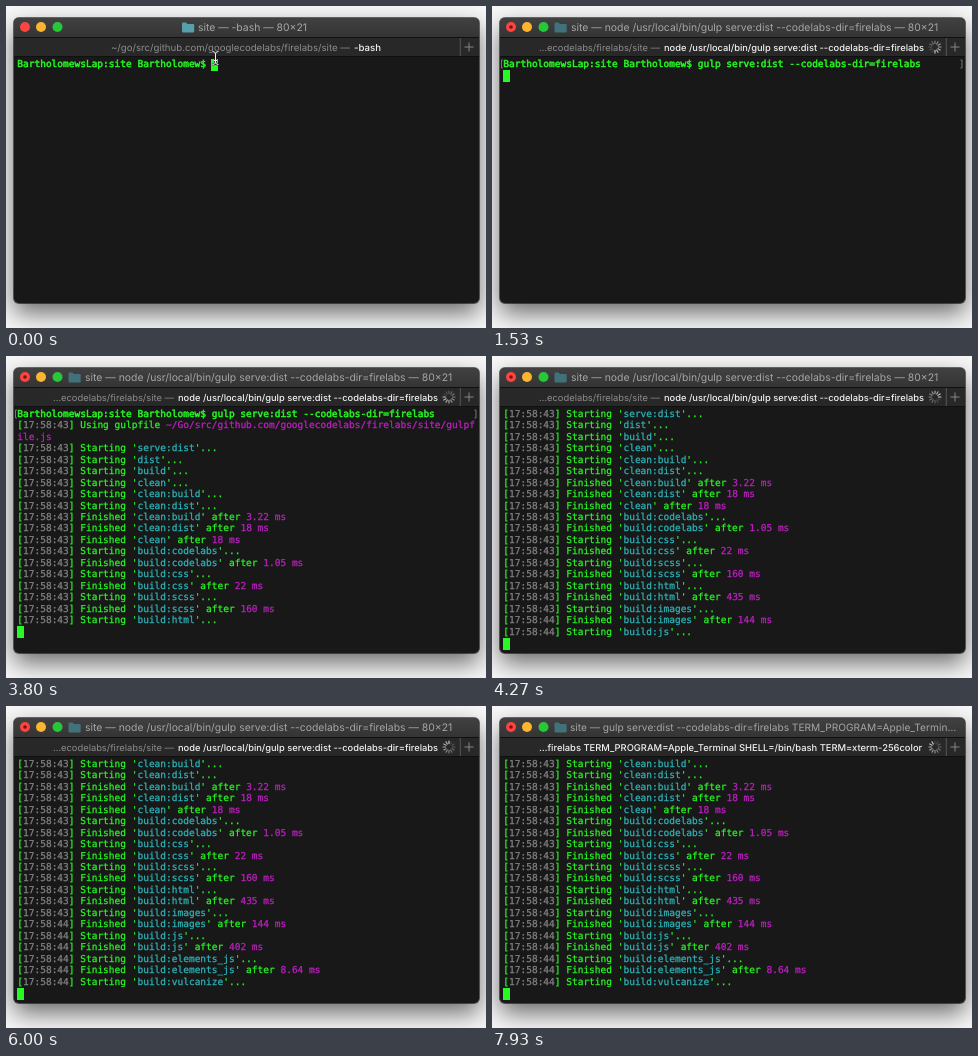
An HTML page that plays this animation: 480 by 322 pixels, repeating every 8000 ms.

```html
<!DOCTYPE html>
<html lang="en">
<meta charset="utf-8">
<title>Terminal build</title>
<style>
html, body { margin: 0; width: 100%; height: 100%; overflow: hidden; background: #f7f7f7; }
body { position: relative; text-rendering: geometricPrecision; }
#win { position: absolute; left: 8px; top: 12px; width: 465px; height: 285px; border-radius: 5px;
  background: #181818; box-shadow: 0 0 0 1px rgba(0, 0, 0, .55), 0 10px 24px rgba(0, 0, 0, .58); }
svg { position: absolute; left: 0; top: 0; font-family: Inter, Roboto, sans-serif; }
svg text { white-space: pre; }
pre { position: absolute; left: 11.3px; top: 52.9px; margin: 0; color: #28f824;
  font: 9.5px/11.45px "DejaVu Sans Mono", monospace; -webkit-text-stroke: .25px; }
pre i { font-style: normal; }
.p { -webkit-text-stroke: .5px; }
.t { color: #838383; }
.n { color: #2db4b8; }
.m { color: #bd20c0; }
#cursor { position: absolute; width: 6.7px; height: 12px; background: #28f824; }
</style>
<div id="win"></div>
<svg width="480" height="322">
  <defs>
    <linearGradient id="bar" x2="0" y2="1">
      <stop stop-color="#414141"/><stop offset="1" stop-color="#343434"/>
    </linearGradient>
  </defs>
  <path d="M8 31V17a5 5 0 0 1 5-5H468a5 5 0 0 1 5 5V31Z" fill="url(#bar)"/>
  <path d="M8 31H473V50H8Z" fill="#282828"/>
  <path d="M8 31.5H473M8 50.5H473" stroke="#101010"/>
  <path d="M454.3 32V50" stroke="#555"/>
  <path d="M458.5 41H467.5M463 36.5V45.5" stroke="#858585"/>
  <circle cx="19" cy="21" r="5" fill="#fc4540"/>
  <circle cx="35" cy="21" r="5" fill="#fdb42e"/>
  <circle cx="51.5" cy="21" r="5" fill="#27c73a"/>
  <circle id="busy" cx="19" cy="21" r="1.8" fill="#7d0f0c"/>
  <path id="folder" d="M0 1.2Q0 0 1.2 0H4.2L5.4 1.4H11Q12.2 1.4 12.2 2.6V8.8Q12.2 10 11 10H1.2Q0 10 0 8.8Z"/>
  <text id="title" y="25" fill="#a6a6a6"></text>
  <text id="path" y="44.5" fill="#8c8c8c"></text>
  <text id="task" y="44.5" fill="#f2f2f2" font-weight="500"></text>
  <g id="spinner" stroke="#c8c8c8" stroke-width="1.2" stroke-linecap="round"></g>
  <path id="marks" d="M11 54H9.5V62H11M468.5 54H470V62H468.5" fill="none" stroke="#777"/>
</svg>
<pre id="log"></pre>
<div id="cursor"></div>
<svg id="beam" width="480" height="322" fill="none">
  <defs>
    <path id="ibeam" d="M206.5 45.5Q209.5 45.5 209.5 48V56Q209.5 58.5 206.5 58.5M212.5 45.5Q209.5 45.5 209.5 48M209.5 56Q209.5 58.5 212.5 58.5M208 54.5H211"/>
  </defs>
  <use href="#ibeam" stroke="#222" stroke-width="2.2"/>
  <use href="#ibeam" stroke="#eee"/>
</svg>
<script>
const $ = id => document.getElementById(id);
const COL = 5.719, ROW = 11.45;
const prompt = "BartholomewsLap:site Bartholomew$ ";
const command = "gulp serve:dist --codelabs-dir=firelabs";
const span = (cls, text) => `<i class="${cls}">${text}</i>`;

// A task with a duration has finished; one without is starting.
const tasks = `serve:dist|dist|build|clean|clean:build|clean:dist|clean:build 3.22|clean:dist 18|clean 18|
build:codelabs|build:codelabs 1.05|build:css|build:css 22|build:scss|build:scss 160|build:html|build:html 435|
build:images|build:images 144|build:js|build:js 402|build:elements_js|build:elements_js 8.64|build:vulcanize`;
const stamp = sec => `[${span("t", "17:58:" + sec)}] `;
const lines = [
  span("p", prompt + command),
  stamp(43) + "Using gulpfile " + span("m", "~/Go/src/github.com/googlecodelabs/firelabs/site/gulpf"),
  span("m", "ile.js"),
  ...tasks.split("|").map((task, i) => {
    const [name, ms] = task.trim().split(" ");
    return stamp(i < 18 ? 43 : 44) + (ms ? "Finished" : "Starting") + ` '${span("n", name)}'` +
      (ms ? " after " + span("m", ms + " ms") : "...");
  })
];

// Time and number of printed lines
const prints = [[870, 1], [3530, 3], [3600, 17], [3730, 19], [4130, 21], [4270, 23], [4530, 27]];

// Each text is [x, text, font size].
const heads = [
  { at: 0, folder: 176, title: [192, "site — -bash — 80×21", 10.4],
    path: [105, "~/go/src/github.com/googlecodelabs/firelabs/site — ", 9.65], task: [348, "-bash", 9.65] },
  { at: 1000, folder: 62.5, title: [79, `site — node /usr/local/bin/${command} — 80×21`, 10.42],
    path: [47, "…ecodelabs/firelabs/site — ", 9.35], task: [172, "node /usr/local/bin/" + command, 9.3] },
  { at: 6730, folder: 62.5, title: [78, `site — ${command} TERM_PROGRAM=Apple_Termin…`, 10.17],
    path: [47, "", 9.35], task: [47, "…firelabs TERM_PROGRAM=Apple_Terminal SHELL=/bin/bash TERM=xterm-256color", 9.4] }
];

function put(id, [x, text, size]) {
  const el = $(id);
  el.setAttribute("x", x);
  el.setAttribute("font-size", size);
  el.textContent = text;
}
const show = (id, on) => $(id).style.visibility = on ? "visible" : "hidden";

for (let i = 0; i < 12; i++)
  $("spinner").innerHTML += `<path d="M443 37.6V35" transform="rotate(${i * 30} 443 41)"/>`;
const spokes = [...$("spinner").children];

let lastHead, lastLog;
function draw(t) {
  const head = heads.findLast(h => t >= h.at);
  if (head !== lastHead) {
    lastHead = head;
    for (const id of ["title", "path", "task"]) put(id, head[id]);
    $("folder").setAttribute("transform", `translate(${head.folder} 16.5)`);
    $("folder").setAttribute("fill", head.at ? "#41727b" : "#57a0ab");
    show("busy", head.at);
    show("spinner", head.at);
  }
  const step = Math.floor(t * 12 / 1000);
  spokes.forEach((s, i) => s.setAttribute("opacity", 1 - .075 * ((step - i + 120) % 12)));

  const count = (prints.findLast(p => t >= p[0]) || [0, 0])[1];
  const first = Math.max(0, count - 20);
  const typed = prompt + (t >= 270 ? command : "");
  const log = count ? lines.slice(first, count).join("\n") : span("p", typed);
  if (log !== lastLog) $("log").innerHTML = lastLog = log;
  $("cursor").style.left = 11 + (count ? 0 : typed.length * COL) + "px";
  $("cursor").style.top = 52.5 + (count - first) * ROW + "px";
  show("marks", count && !first);
  show("beam", !count);
}

function frame() {
  draw(performance.now() % 8000);
  requestAnimationFrame(frame);
}
frame();
</script>
</html>
```
